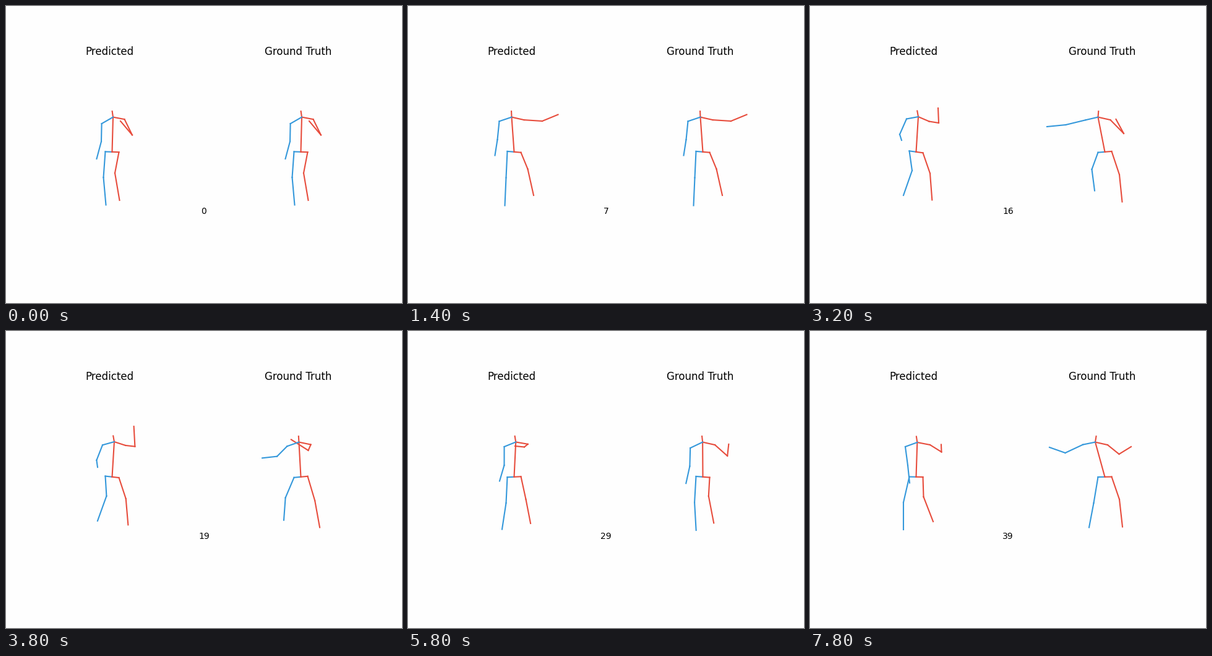
Animation of 640 by 480 pixels, one loop 8000 ms. Source, as a matplotlib script:

```python
import numpy as np
import matplotlib.pyplot as plt
from matplotlib.animation import FuncAnimation

W, H, DPI = 640, 480, 100
FRAMES, STEP_MS = 40, 200
BLUE, RED = "#3498db", "#e74c3c"
PANEL_GAP = 305
HIP = np.array([171.5, 235.8])
HALF_HIP = 11

# The real walk repeats; the prediction copies it up to HANDOVER.
PERIOD, TURN, HANDOVER = 26.5, 23, 7
PHASES = [0, 7, 12.5, 16, TURN]

# Joints at PHASES, in pixels of the left panel (l = left, r = right).
NECK_X = [173, 167.5, 156, 160.5, 176.5]
GAIT = {
    "l_elbow": [(204, 208.5), (217, 186), (194.5, 199), (202, 206), (155, 173)],
    "l_wrist": [(185, 186), (242.5, 175.5), (214, 187), (189.5, 183), (124, 167.5)],
    "r_elbow": [(154, 219), (144.5, 216), (107.5, 197), (108.5, 192), (169.5, 219)],
    "r_wrist": [(146.5, 247), (140.5, 241.5), (82, 188), (78, 195), (157, 224)],
    "l_knee": [(176, 270), (193.5, 263.5), (195, 272), (195, 272.5), (191, 276)],
    "l_ankle": [(183.5, 314), (203, 306), (200, 316.5), (199.5, 316.5), (206, 319)],
    "r_knee": [(157.5, 277), (158.5, 277.5), (153.5, 278), (150.5, 264), (143, 278)],
    "r_ankle": [(161.5, 321.5), (156.5, 322.5), (146, 317.5), (155, 298.5), (127, 319)],
}

# Turning points of the predicted pose as it settles: {time: position}.
SETTLE = {
    "neck": {16: (175, 179), 39: (173.3, 180)},
    "l_shoulder": {16: (192.5, 186.5), 23: (193.5, 182.5), 39: (194, 184)},
    "l_elbow": {16: (208, 189), 23: (209, 183), 29: (188, 187.5), 39: (212.5, 195.5)},
    "l_wrist": {16: (207, 165), 20: (206.5, 152.5), 23: (206, 161.5),
                29: (173, 186), 35: (188, 174), 39: (212, 183.5)},
    "r_shoulder": {16: (156, 182.5), 23: (156, 187), 39: (154, 187)},
    "r_elbow": {16: (145, 207.5), 29: (155.5, 217), 39: (158, 217)},
    "r_wrist": {16: (148, 217), 29: (148, 242.5), 39: (161, 245.5)},
    "l_knee": {16: (194, 270.5), 29: (190.5, 272), 39: (183.5, 268)},
    "l_ankle": {16: (197.3, 313.5), 39: (199, 308)},
    "r_knee": {16: (165, 266), 23: (158.5, 269), 29: (158.5, 278), 39: (151, 277)},
    "r_ankle": {16: (151, 306), 23: (145, 310), 29: (152, 320.5), 39: (151, 320.5)},
    "tilt": {16: 1.5, 29: -0.5, 39: 0.2},
}

CHAINS = [
    (BLUE, ["hip", "r_hip", "r_knee", "r_ankle"]),
    (RED, ["hip", "l_hip", "l_knee", "l_ankle"]),
    (RED, ["hip", "neck", "head"]),
    (RED, ["neck", "l_shoulder", "l_elbow", "l_wrist"]),
    (BLUE, ["neck", "r_shoulder", "r_elbow", "r_wrist"]),
]
BONES = [(a, b, color) for color, chain in CHAINS
         for a, b in zip(chain, chain[1:])]


def spline(times, points, t):
    """Smooth curve through the points, without overshoot."""
    x, p = np.array(times, float), np.array(points, float)
    gaps = np.diff(x)
    sec = (np.diff(p, axis=0).T / gaps).T
    a, b = sec[:-1], sec[1:]
    same = a * b > 0
    mid = np.where(same, 2 * a * b / np.where(same, a + b, 1), 0)
    slope = np.concatenate([sec[:1], mid, sec[-1:]])
    i = int(np.clip(np.searchsorted(x, t, side="right") - 1, 0, len(gaps) - 1))
    u = (t - x[i]) / gaps[i]
    ease = u * u * (3 - 2 * u)
    bend = u * (1 - u) * ((1 - u) * slope[i] - u * slope[i + 1])
    return p[i] + ease * (p[i + 1] - p[i]) + gaps[i] * bend


def cycle(points, phase):
    times = [PHASES[-1] - PERIOD, *PHASES, PERIOD, PERIOD + PHASES[1]]
    return spline(times, [points[-1], *points, *points[:2]], phase)


def walk(t):
    """Joints of the real walk."""
    phase = t % PERIOD
    angle = 2 * np.pi * phase / PERIOD
    away = (phase - TURN + PERIOD / 2) % PERIOD - PERIOD / 2
    turn = np.exp(-(away / 2.5) ** 2)
    joints = {name: cycle(points, phase) for name, points in GAIT.items()}
    neck = np.array([cycle(NECK_X, phase), 179.6])
    joints["neck"] = neck
    joints["l_shoulder"] = neck + (20 - 10.5 * turn, 4.5 - 7 * turn)
    joints["r_shoulder"] = neck + (11.5 * turn - 20,
                                   7 + 3 * np.cos(angle) + 4 * turn)
    joints["tilt"] = np.cos(angle - 1.2)
    return joints


def predict(t):
    """Joints that leave the walk at HANDOVER and settle."""
    if t <= HANDOVER:
        return walk(t)
    start = walk(HANDOVER)
    return {name: spline([HANDOVER, *keys], [start[name], *keys.values()], t)
            for name, keys in SETTLE.items()}


def complete(joints):
    side = np.array([HALF_HIP, joints["tilt"]])
    neck = joints["neck"]
    head = neck + (0.17 * (165 - neck[0]), -9.5)
    return {**joints, "hip": HIP, "l_hip": HIP + side, "r_hip": HIP - side,
            "head": head}


fig = plt.figure(figsize=(W / DPI, H / DPI), dpi=DPI, facecolor="#fefefe")
ax = fig.add_axes([0, 0, 1, 1])
ax.set(xlim=(0, W), ylim=(H, 0))
ax.axis("off")

for x, title in ((167.5, "Predicted"), (472.5, "Ground Truth")):
    ax.text(x, 79, title, fontsize=12, ha="center", va="baseline")
counter = fig.text(0.5, 0.3, "0", fontsize=10, ha="center")


def make_figure():
    return [ax.plot([], [], color=color, lw=1.5)[0] for _, _, color in BONES]


pred_lines, true_lines = make_figure(), make_figure()


def place(lines, joints, dx):
    joints = complete(joints)
    for line, (a, b, _) in zip(lines, BONES):
        (xa, ya), (xb, yb) = joints[a], joints[b]
        line.set_data([xa + dx, xb + dx], [ya, yb])


def update(frame):
    place(pred_lines, predict(frame), 0)
    place(true_lines, walk(frame), PANEL_GAP)
    counter.set_text(str(frame))
    return [*pred_lines, *true_lines, counter]


anim = FuncAnimation(fig, update, frames=FRAMES, interval=STEP_MS,
                     repeat=True, repeat_delay=0)
plt.show()
```
